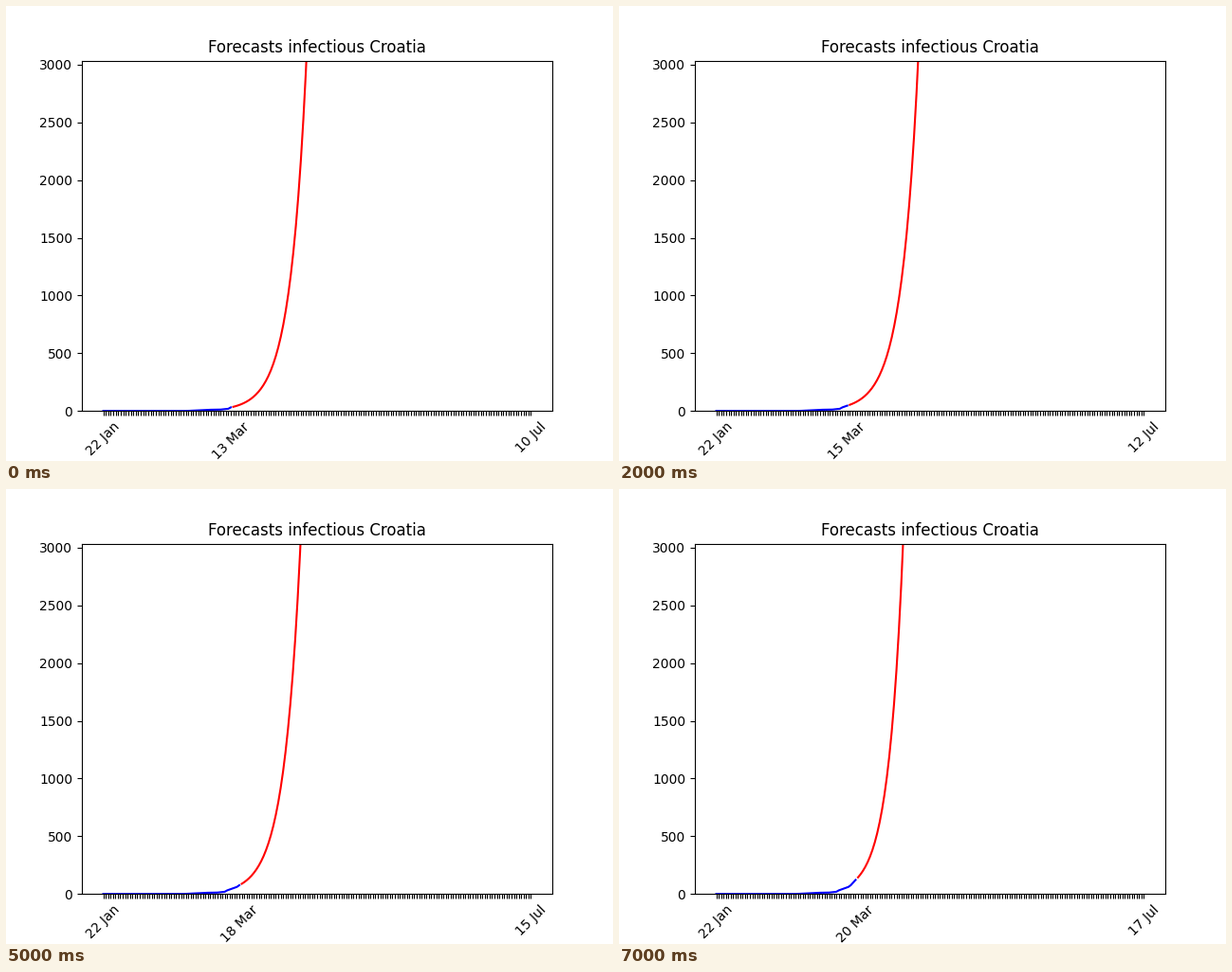
Write a matplotlib script that moves like this. It is 640 px wide and 480 px high and loops after 8000 ms.

```python
import numpy as np
import matplotlib.pyplot as plt
from matplotlib.animation import FuncAnimation

START = np.datetime64("2020-01-22")
FIRST_DAY = 51       # days from START to the first forecast
FORECASTS = 8
HORIZON = 120        # points per forecast
Y_MAX = 3036

fig, ax = plt.subplots(figsize=(6.4, 4.8), dpi=100)


def active(day):
    """Active cases: slow rise, then steeper stretches."""
    return np.interp(day, [33, 43, 47, 50, 51, 55, 56, 58],
                     [0, 10.5, 12, 19, 31, 61, 76, 122])


def growth(i):
    """Daily growth rate: eases off, then picks up again."""
    return np.interp(i, [0, 2, 4, 5, 7],
                     [0.1517, 0.1461, 0.1433, 0.1465, 0.1627])


def day_label(day):
    date = (START + np.timedelta64(day, "D")).item()
    return f"{date.day} {date:%b}"


def draw(i):
    today = FIRST_DAY + i
    last = today + HORIZON
    past = np.arange(today + 1)
    ahead = np.arange(1, HORIZON + 1)

    ax.clear()
    ax.plot(past, active(past), color="blue")
    ax.plot(today + ahead, active(today) * np.exp(growth(i) * ahead),
            color="red")

    # The closing label names the day before the last tick
    labels = [""] * (last + 1)
    labels[0] = day_label(0)
    labels[today] = day_label(today)
    labels[last] = day_label(last - 1)
    ax.set_xticks(range(last + 1), labels, rotation=45)
    ax.set_ylim(0, Y_MAX)
    ax.set_title("Forecasts infectious Croatia")
    return []


anim = FuncAnimation(fig, draw, frames=FORECASTS, interval=1000,
                     init_func=lambda: [], repeat=True, repeat_delay=0)
plt.show()
```
